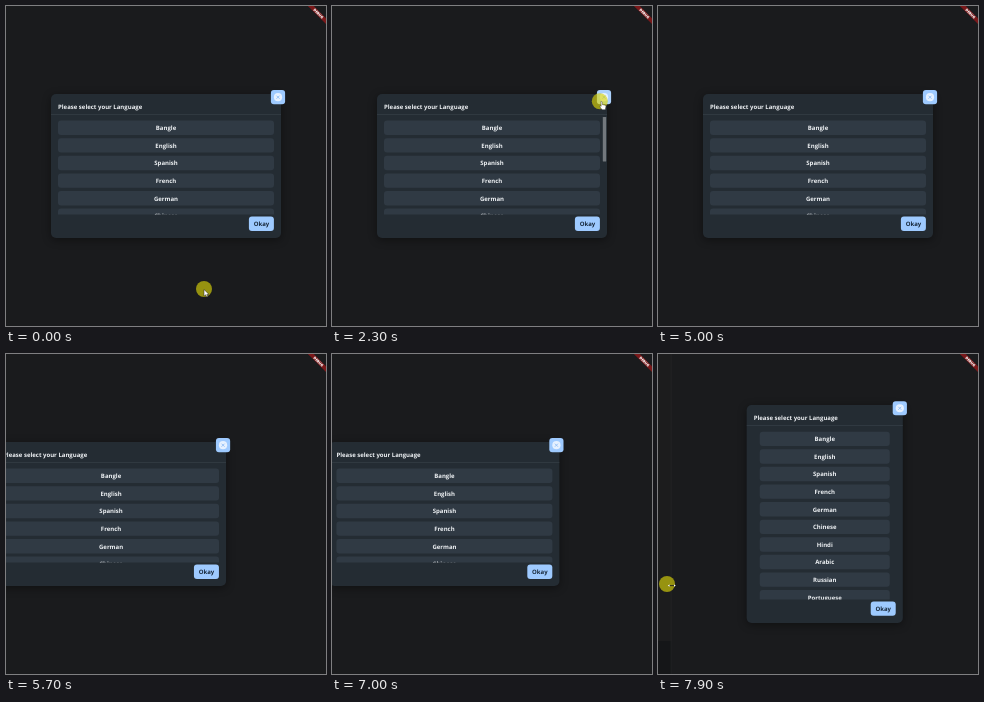
Animation, 320 px wide and 320 px high, one loop 8 s. Source, as an HTML page:

```html
<!DOCTYPE html>
<html lang="en">
<head>
<meta charset="utf-8">
<title>Language dialog</title>
<style>
  html, body { margin: 0; width: 100%; height: 100%; overflow: hidden; background: #1a1b1d; }
  svg { display: block; width: 100%; height: 100%; }
  text { font: 700 6px "Open Sans", "Noto Sans", sans-serif; fill: #eef1f4; text-rendering: geometricPrecision; }
  .mid { text-anchor: middle; }
  .panel { fill: #242c33; filter: drop-shadow(0 2.5px 4px rgba(0, 0, 0, .4)); }
  .item { fill: #303a44; }
  .item.hot { fill: #3a434c; }
  .accent { fill: #9ecaff; }
  .accent.hot { fill: #acd1fc; }
  .ok-label { fill: #17283b; }
  .debug { font-size: 3.7px; font-weight: 800; fill: #fff; }
</style>
</head>
<body>
<svg viewBox="0 0 320 320">
  <defs>
    <clipPath id="listClip"><rect id="clipBox" y="24" width="320"/></clipPath>
  </defs>
  <rect width="320" height="320" fill="#1a1b1d"/>

  <g id="outside">
    <rect x="-20" width="20" height="320" fill="#1c1c1d"/>
    <rect x="-20" y="287" width="20" height="33" fill="#151618"/>
    <rect x="-.8" width=".8" height="320" fill="#242527"/>
  </g>

  <g id="dialog">
    <rect id="panel" class="panel" rx="5"/>
    <text x="7" y="14.9">Please select your Language</text>
    <rect id="rule" y="20" height=".6" fill="#39424a"/>
    <g clip-path="url(#listClip)"><g id="list"></g></g>
    <rect id="bar" y="23" width="3.4" height="44.5" rx=".6" fill="#73787d"/>
    <g id="ok">
      <rect class="accent" x="-12.5" y="-7.2" width="25" height="14.4" rx="3"/>
      <text class="mid ok-label" y="2.4">Okay</text>
    </g>
    <g id="close">
      <rect class="accent" x="-7.1" y="-7.1" width="14.2" height="14.2" rx="3"/>
      <circle r="4.1" fill="#e6f1ff"/>
      <path d="M-1.5-1.5 1.5 1.5M1.5-1.5-1.5 1.5" stroke="#8dbcf5" stroke-width=".9"/>
    </g>
  </g>

  <g transform="translate(320 0) rotate(45)">
    <rect x="-14" y="8.6" width="28" height="4.2" fill="#7a181a"/>
    <text class="mid debug" y="12">DEBUG</text>
  </g>

  <g id="cursor">
    <circle r="8" fill="#dcd60a" fill-opacity=".64"/>
    <path id="arrow" d="M0 .5V7.2L1.6 5.8 2.7 8 3.8 7.5 2.8 5.4H5Z" fill="#fff" stroke="#222" stroke-width=".5"/>
    <path id="hand" d="M1 .4Q2 0 2.4 1V3.3L5.4 4Q6.2 4.3 6.1 5.4L5.5 8.4H2.3L0 5.4Q.2 4.5 1.4 5Z" fill="#fff" stroke="#222" stroke-width=".4"/>
    <g id="resize">
      <path d="M2 1.6H7.6" stroke="#222" stroke-width=".9"/>
      <path d="M.8 1.6 2.6.5V2.7ZM8.8 1.6 7 .5V2.7Z" fill="#fff"/>
    </g>
  </g>
</svg>
<script>
const LOOP = 8000, STEP = 100, PITCH = 17.6;
const LEAVE = 4700, RETURN = 7000, RESHAPE = 7500;
const LANGS = ["Bangle", "English", "Spanish", "French", "German", "Chinese",
  "Hindi", "Arabic", "Russian", "Portuguese"];

// The pointer visits the close button, Okay and the list, then leaves the window.
const LEGS = [
  { from: 1100, to: 2000, x: 268, y: 94 },
  { from: 2250, to: 3100, x: 249, y: 220 },
  { from: 3150, to: 3800, x: 144, y: 204, sag: 68 },
  { from: 3950, to: LEAVE, x: -20, y: 214 }
];

const $ = id => document.getElementById(id);
const set = (el, attrs) => { for (const k in attrs) el.setAttribute(k, attrs[k]); };
const move = (el, x, y) => set(el, { transform: `translate(${x} ${y})` });
const show = (el, on) => { el.style.display = on ? "" : "none"; };
const within = (x, y, cx, cy, hw, hh) => Math.abs(x - cx) < hw && Math.abs(y - cy) < hh;
const ramp = (t, from, to) => Math.min(1, Math.max(0, (t - from) / (to - from)));
const smooth = k => k * k * (3 - 2 * k);
const easeOut = k => Math.sin(k * Math.PI / 2);

function make(tag, attrs, parent) {
  const el = document.createElementNS("http://www.w3.org/2000/svg", tag);
  set(el, attrs);
  return parent.appendChild(el);
}

const items = LANGS.map((name, i) => {
  const y = 33.8 + i * PITCH;
  const box = make("rect", { class: "item", y: y - 7.2, height: 14.4, rx: 3 }, $("list"));
  make("text", { class: "mid", y: y + 2.3 }, $("list")).textContent = name;
  return { box, y };
});

// Left window edge: dragged out, eased back a little, then pulled inside.
function windowEdge(t) {
  return -122 * easeOut(ramp(t, 5200, 5900))
    + 20 * smooth(ramp(t, 6000, 6870))
    + 115.5 * smooth(ramp(t, 6870, 7750));
}

function pointer(t, edge) {
  if (t > LEAVE) return [edge - 4.5, 230];
  let x = 198, y = 283, dip = 0;
  for (const leg of LEGS) {
    const k = smooth(ramp(t, leg.from, leg.to));
    x += (leg.x - x) * k;
    y += (leg.y - y) * k;
    dip += (leg.sag || 0) * Math.sin(Math.PI * k);
  }
  return [x, y + dip];
}

function draw(t) {
  const edge = windowEdge(t);
  const [px, py] = pointer(t, edge);
  const shrink = 7.5 * Math.max(0, (t - RESHAPE) / 100) ** 1.65;
  const w = 230 - shrink, h = 144 + shrink;
  const left = 160 + edge / 2 - w / 2, top = 160 - h / 2;
  const itemW = shrink > 0 ? 130 : 216;
  const x = px - left, y = py - top;
  const okX = w - 19.6, okY = h - 14.3;
  const closeX = w - 3, closeY = 3.2;

  move($("outside"), edge, 0);
  move($("dialog"), left, top);
  set($("panel"), { width: w, height: h });
  set($("rule"), { width: w });
  set($("clipBox"), { height: h - 47.4 });
  move($("list"), w / 2, 0);
  move($("ok"), okX, okY);
  move($("close"), closeX, closeY);
  set($("bar"), { x: w - 4.2, opacity: ramp(t, 1600, 1800) - ramp(t, 2800, 3100) });

  let hot = false;
  const mark = (el, on) => { el.classList.toggle("hot", on); hot = hot || on; };
  for (const { box, y: cy } of items) {
    set(box, { x: -itemW / 2, width: itemW });
    mark(box, y < h - 23 && within(x, y, w / 2, cy, itemW / 2, 7.2));
  }
  mark($("ok").firstElementChild, within(x, y, okX, okY, 12.5, 7.2));
  mark($("close").firstElementChild, within(x, y, closeX, closeY, 7.1, 7.1));

  const resizing = t > LEAVE;
  move($("cursor"), px, py);
  show($("cursor"), !resizing || t > RETURN);
  show($("resize"), resizing);
  show($("hand"), hot && !resizing);
  show($("arrow"), !hot && !resizing);
}

const start = performance.now();
function tick() {
  const t = (performance.now() - start) % LOOP;
  draw(Math.floor(t / STEP) * STEP);
  requestAnimationFrame(tick);
}
tick();
</script>
</body>
</html>
```
